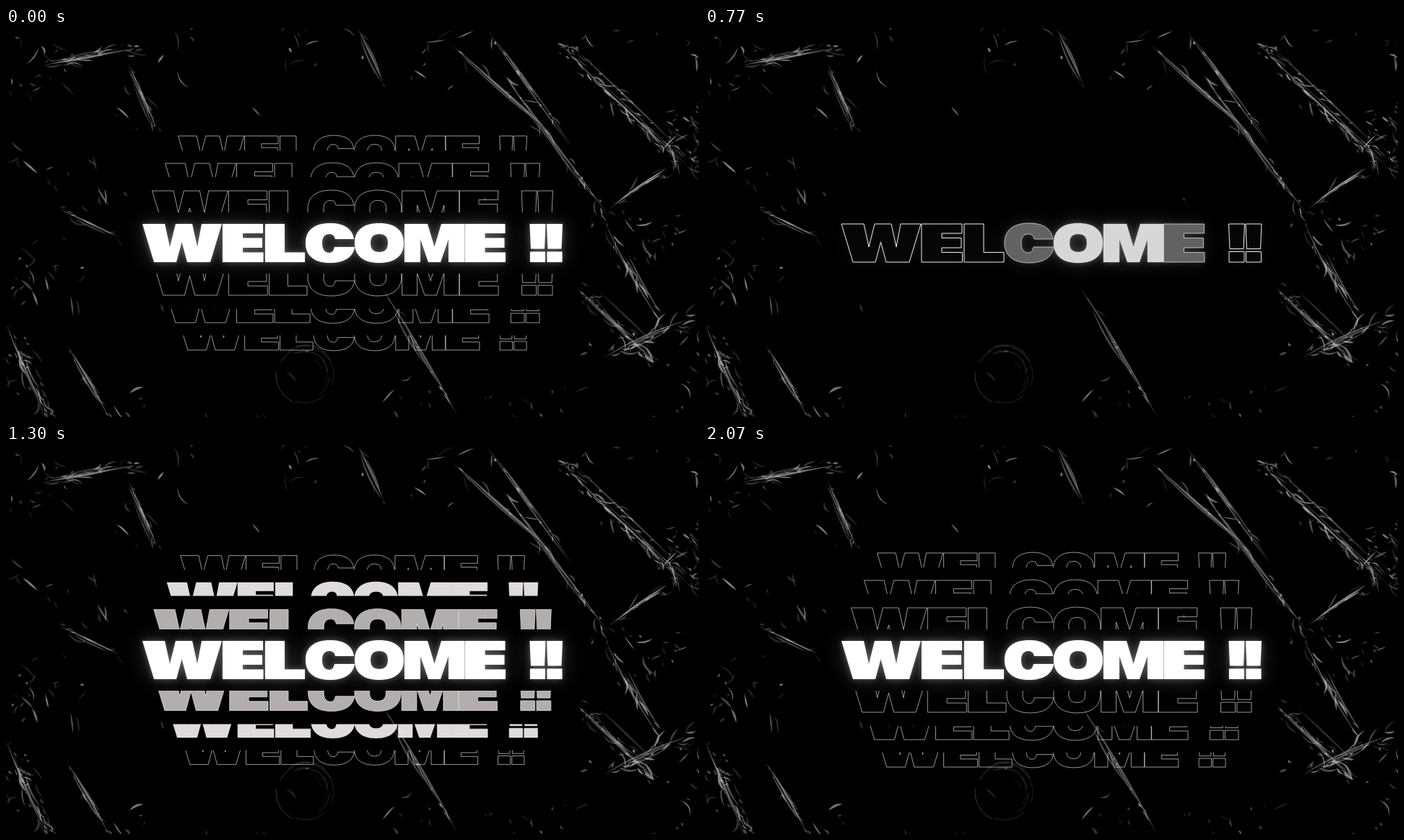
Animation, 960 px wide and 540 px high, one loop 2.17 s. Source, as an HTML page with a canvas:

```html
<!DOCTYPE html>
<html lang="en">
<head>
<meta charset="utf-8">
<title>Welcome</title>
<style>
html, body { margin: 0; width: 100%; height: 100%; overflow: hidden; background: #000; }
canvas { display: block; }
</style>
</head>
<body>
<canvas id="stage" width="960" height="540" role="img" aria-label="WELCOME !!"></canvas>
<script>
const LOOP = 2170, CX = 480, CY = 298.5, HALF = 291, CAP = 26.5;
const ctx = stage.getContext('2d');
const clamp = v => Math.max(0, Math.min(1, v));

// Extra-wide lettering, drawn at full size around (CX, CY)
const letterE = x => `M${x} 272h56v13h-28v6.5h27v13.5h-27v6.5h28.500v13.5h-56.500z`;
const bang = x => `M${x} 272h22l-1.500 34.500h-19zM${x + .5} 310.500h21v14.500h-21z`;
const glyphs = [
  'M189 272H220L227 304 235 272H258L265 304 271 272H299L283 325H251L243.500 297 236 325H205z',
  letterE(300),
  'M359 272h27v39.500h28v13.500h-55z',
  'M482 293C480 279 469 271 449 271C427 271 415 281 415 298.500C415 316 427 326 449 326C469 326 481 318 483 304H455C454 309 452 312 448 312C442 312 438 308 438 298.500C438 290 442 286 448 286C452 286 455 288 456 293z',
  'M517 271C539 271 551 281 551 298.500C551 316 539 326 517 326C495 326 483 316 483 298.500C483 281 495 271 517 271zM517 286C509 286 505 290 505 298.500C505 307 509 311 517 311C525 311 529 307 529 298.500C529 290 525 286 517 286z',
  'M552 272H584L593.500 304 603 272H635V325H613V293L602 325H585L574 293V325H552z',
  letterE(635.5),
  '', // space
  bang(725.5),
  bang(749)
].map(d => new Path2D(d));
const word = new Path2D();
glyphs.forEach(g => word.addPath(g));

// Main folds of the film: x1, y1, x2, y2, roughness
const folds = [
  [615, 22, 760, 150, 2], [665, 0, 783, 165, 2], [685, 60, 838, 265, 4],
  [765, 20, 948, 195, 14], [835, 252, 915, 195, 6], [830, 270, 904, 404, 6],
  [790, 360, 900, 465, 13], [828, 458, 945, 405, 10], [520, 360, 626, 540, 2],
  [0, 410, 60, 540, 12], [84, 440, 142, 540, 4], [72, 250, 158, 291, 4],
  [50, 52, 180, 28, 9], [170, 50, 210, 142, 6], [487, 0, 524, 78, 2]
];

function makeFilm() {
  const film = new OffscreenCanvas(960, 540), c = film.getContext('2d');
  let seed = 7;
  const rnd = () => (seed = seed * 16807 % 2147483647) / 2147483647;
  const spread = () => rnd() + rnd() - 1;

  // Thin curved leaf between two points
  function sliver(x1, y1, x2, y2, bend, light, thick) {
    const len = Math.hypot(x2 - x1, y2 - y1) || 1;
    const nx = (y1 - y2) / len, ny = (x2 - x1) / len;
    const mx = (x1 + x2) / 2, my = (y1 + y2) / 2;
    c.beginPath();
    c.moveTo(x1, y1);
    for (const [b, x, y] of [[bend + thick, x2, y2], [bend - thick, x1, y1]])
      c.quadraticCurveTo(mx + nx * b * 2, my + ny * b * 2, x, y);
    c.fillStyle = `rgba(215,215,215,${light})`;
    c.fill();
  }
  function fleck(x, y, angle) {
    const len = 5 + 26 * rnd() ** 2;
    sliver(x, y, x + len * Math.cos(angle), y + len * Math.sin(angle),
      spread() * len * .25, .15 + .45 * rnd() ** 2, .5 + rnd() * 1.2);
  }

  c.fillStyle = '#000';
  c.fillRect(0, 0, 960, 540);
  for (const [x1, y1, x2, y2, rough] of folds) {
    const dx = x2 - x1, dy = y2 - y1, len = Math.hypot(dx, dy), angle = Math.atan2(dy, dx);
    for (let i = 0; i < 4; i++) {
      const a = i && rnd() * .4, b = i ? .6 + rnd() * .4 : 1, shift = i && spread() * rough;
      sliver(x1 + dx * a + shift, y1 + dy * a - shift, x1 + dx * b + shift, y1 + dy * b - shift,
        spread() * 5, .4 - .06 * i, .9 + rnd() * .6);
    }
    for (let i = 0; i < len * rough / 45; i++) {
      const u = rnd(), v = spread() * rough;
      fleck(x1 + dx * u - dy / len * v, y1 + dy * u + dx / len * v, angle + spread() * .8);
    }
  }
  // Loose wrinkles, in clumps that thicken towards the edges
  for (let i = 0; i < 2600; i++) {
    const x = rnd() * 960, y = rnd() * 540;
    const edge = Math.max(Math.abs(x - 480) / 480, Math.abs(y - 270) / 310);
    const clump = Math.sin(x / 31 + y / 57) + Math.sin(y / 23 - x / 83);
    if (clump > .1 && rnd() < edge ** 6) fleck(x, y, (rnd() < .3 ? -.6 : 1) + spread() * .7);
  }
  // Round knot at the bottom
  for (let i = 0; i < 14; i++) {
    const a = rnd() * 6.28, r = 42 - 26 * rnd() ** 2;
    c.beginPath();
    c.arc(415, 482, r, a, a + .5 + rnd());
    c.lineWidth = .8;
    c.strokeStyle = `rgba(215,215,215,${.12 + .2 * rnd()})`;
    c.stroke();
  }
  return film;
}
const film = makeFilm();

// Flash that starts at full strength and dies away
const decay = (t, start, length) => (1 - clamp((t - start) / length)) ** 1.3;

// Size and distance from the middle of copy i; copy 0 is the main word
function place(i, t) {
  if (!i) return { scale: 1, off: 0, limit: CAP + 16 };
  const rest = t < 750 ? 0 : (1 - clamp((t - 750) / 1050)) ** 4;
  const scale = (295.5 - 18 * i - rest * (32.7 + 9.6 * i)) / HALF;
  const off = 7.5 + 39.7 * i - rest * (29.5 + 12.2 * i);
  return { scale, off, limit: off + (CAP + 20) * scale };
}

function drawCopy(i, side, t) {
  const { scale, off } = place(i, t), { limit } = place(i - 1, t);
  const line = t < 750
    ? 1 - clamp((t - 50 - 80 * i) / 430)
    : clamp((t - 700 - 50 * i) / 200);
  const start = 1010 + 110 * i;
  const fill = clamp((t - start) / 50) * decay(t, start, 750);
  ctx.save();
  ctx.beginPath();
  ctx.rect(0, side < 0 ? 0 : CY + limit, 960, side < 0 ? CY - limit : 540);
  ctx.clip();
  ctx.translate(CX, CY + side * off);
  ctx.scale(scale, scale);
  ctx.translate(-CX, -CY);
  ctx.fillStyle = `rgba(255,250,250,${fill})`;
  ctx.fill(word);
  ctx.lineWidth = .9 / scale;
  ctx.strokeStyle = `rgba(255,255,255,${.65 * line})`;
  ctx.stroke(word);
  ctx.restore();
}

function drawMain(t) {
  const fade = decay(t, 130, 680);
  // Letters light up from the middle outwards
  const levels = glyphs.map((_, n) => Math.max(fade,
    clamp((t - 670 - 55 * (Math.abs(n - 4.5) - .5)) / 120)));

  // Glow: the letters are drawn off stage and only their shadow lands on it
  ctx.save();
  ctx.translate(-2000, 0);
  ctx.shadowOffsetX = 2000;
  ctx.fillStyle = '#fff';
  for (const [blur, power] of [[30, .22], [8, .3]]) {
    ctx.shadowBlur = blur;
    glyphs.forEach((g, n) => {
      ctx.shadowColor = `rgba(255,255,255,${power * (.2 + .8 * levels[n])})`;
      ctx.fill(g);
    });
  }
  ctx.restore();

  ctx.lineWidth = 1;
  glyphs.forEach((g, n) => {
    const v = levels[n], grey = Math.round(255 * v);
    ctx.fillStyle = `rgb(${grey},${grey},${grey})`;
    ctx.fill(g);
    ctx.strokeStyle = `rgba(255,255,255,${.85 * (1 - v) + .1})`;
    ctx.stroke(g);
  });
}

function draw() {
  const t = performance.now() % LOOP;
  ctx.drawImage(film, 0, 0);
  for (const i of [3, 2, 1]) {
    drawCopy(i, -1, t);
    drawCopy(i, 1, t);
  }
  drawMain(t);
  requestAnimationFrame(draw);
}
draw();
</script>
</body>
</html>
```
